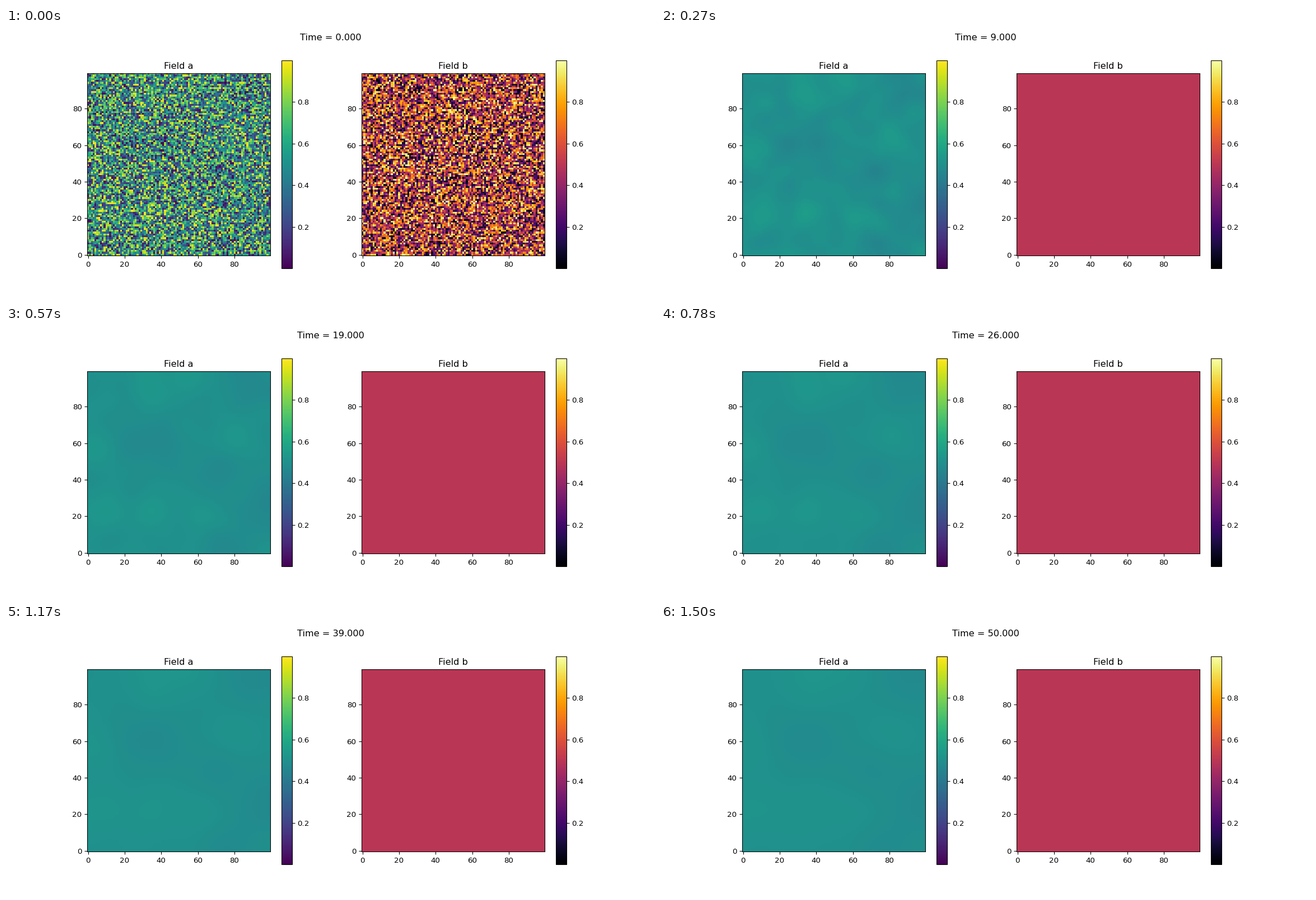
Animation, 1159 px wide and 483 px high, one loop 1530 ms. Source, as a matplotlib script:

```python
import numpy as np
import matplotlib.pyplot as plt
from matplotlib.animation import FuncAnimation

N = 100
FRAMES = 51
INTERVAL = 30
DIFF_A, DIFF_B = 1, 100

# Cosine eigenvectors of the discrete Laplacian with no-flux walls
k = np.arange(N)
BASIS = np.cos(np.pi * np.outer(k + 0.5, k) / N) * np.sqrt(2 / N)
BASIS[:, 0] /= np.sqrt(2)
decay = 2 - 2 * np.cos(np.pi * k / N)
RATE = decay[:, None] + decay[None, :]


def diffuse(field, amount):
    """Solve the heat equation exactly for diffusivity * time = amount."""
    if amount == 0:
        return field
    modes = BASIS.T @ field @ BASIS
    return BASIS @ (modes * np.exp(-RATE * amount)) @ BASIS.T


def bumps(points, size):
    y, x = np.mgrid[:N, :N]
    return sum(np.exp(-((x - px) ** 2 + (y - py) ** 2) / (2 * size**2))
               for px, py in points)


def noisy_field(seed, high, low, height, size, smooth, mean=0.5):
    """Uniform noise that settles into broad high and low patches."""
    noise = np.random.default_rng(seed).random((N, N))
    noise -= diffuse(noise, smooth)
    noise += height * (bumps(high, size) - bumps(low, size))
    # Ranking restores an even spread of values
    ranks = noise.ravel().argsort().argsort().reshape(N, N) / (N * N - 1)
    return 0.001 + 0.998 * ranks ** (1 / mean - 1)


start_a = noisy_field(
    4,
    high=[(10, 22), (35, 22), (62, 18), (32, 88), (53, 97), (80, 64), (6, 57)],
    low=[(22, 62), (40, 60), (88, 90), (70, 45), (92, 25), (73, 4)],
    height=0.07, size=5, smooth=9)
start_b = noisy_field(
    9,
    high=[(25, 58), (75, 82)],
    low=[(92, 25), (33, 85)],
    height=0.012, size=10, smooth=100, mean=0.498)

fig, (ax_a, ax_b) = plt.subplots(1, 2, figsize=(12, 5), dpi=96.61)


def show_field(ax, field, cmap, title):
    image = ax.imshow(field, cmap=cmap, origin="lower")
    ax.set_title(title)
    fig.colorbar(image, ax=ax)
    return image


image_a = show_field(ax_a, start_a, "viridis", "Field a")
image_b = show_field(ax_b, start_b, "inferno", "Field b")
clock = fig.suptitle("Time = 0.000")


def update(t):
    image_a.set_data(diffuse(start_a, DIFF_A * t))
    image_b.set_data(diffuse(start_b, DIFF_B * t))
    clock.set_text(f"Time = {t:.3f}")
    return image_a, image_b, clock


anim = FuncAnimation(fig, update, frames=FRAMES, interval=INTERVAL,
                     repeat=True, repeat_delay=0)
plt.show()
```
